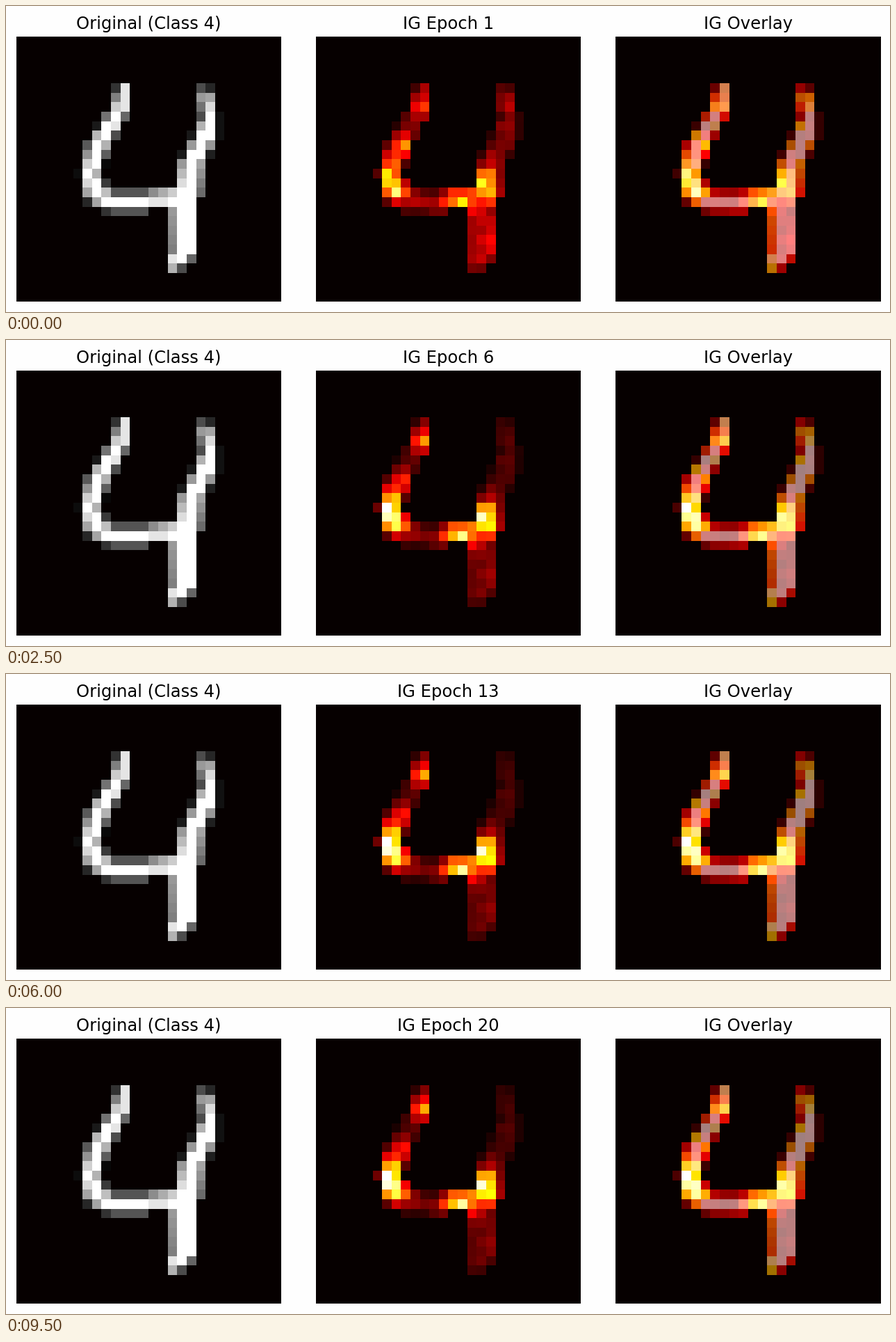
Write a matplotlib script that moves like this. It is 1272x440 px and loops after 10000 ms.

```python
import numpy as np
import matplotlib.pyplot as plt
from matplotlib.animation import FuncAnimation

W, H, DPI = 1272, 440, 100
EPOCHS, INTERVAL = 20, 500
N = 28
LEFT, STEP, TOP, SIDE = 14.8, 431.3, 44.35, 381
SETTLE = 2.5  # epochs
BLACK = np.array([6, 0, 0]) / 255
HOT = plt.get_cmap("hot")

plt.rcParams["font.family"] = "DejaVu Sans"

# Outline key points of each stroke: (line, near edge, far edge).
# The arms run down the rows, the bar runs across the columns.
LEFT_ARM = [(5, 10.8, 11.9), (7, 10.2, 11.9), (9, 8.9, 10.9),
            (11, 7.65, 9.7), (14, 6.95, 8.7), (16, 7.35, 9.75)]
RIGHT_ARM = [(5, 19.7, 20.15), (6, 19.4, 20.65), (8, 19.7, 21.07),
             (10, 18.9, 21.07), (13, 17.4, 19.65), (16, 17, 19.42),
             (17, 16, 19), (18, 16.4, 19), (22, 16.5, 19),
             (23, 16.1, 18.4), (24, 16.3, 17.3)]
BAR = [(7, 17, 17.15), (8, 17, 17.65), (9, 16.9, 18.2), (10, 16.67, 18.33),
       (13, 16.67, 18.33), (14, 16.45, 17.9), (16, 16.2, 17.9)]

# Hot spots: row, column, radius, strength at the start and when trained.
SPOTS = [(14.2, 7.6, 1.6, .5, .9),     # elbow
         (16, 8, .5, .65, .45),        # elbow corner
         (11.5, 9, .8, .45, .25),      # left arm
         (7.1, 11.1, 1, .25, .5),      # left tip
         (15.2, 17.2, 1.3, .5, .75),   # junction
         (17, 14.5, 1.2, .5, .75),     # crossbar
         (6.5, 20, .8, .2, .03),       # right tip
         (21.5, 17.7, 2, .15, .08)]    # stem
BASE_START, BASE_END = .18, .1


def stroke(knots):
    """Share of each cell that lies between the two edges."""
    pos, near, far = np.array(knots).T
    lines = np.arange(N)[:, None]
    cells = np.arange(N)
    low = np.interp(lines, pos, near)
    high = np.interp(lines, pos, far)
    cover = np.clip(np.minimum(cells + 1, high) - np.maximum(cells, low), 0, 1)
    return cover * ((lines >= pos[0]) & (lines <= pos[-1]))


def make_heat(ink):
    """Attribution at the start and after training."""
    rows, cols = np.mgrid[:N, :N]
    start = np.full((N, N), BASE_START)
    end = np.full((N, N), BASE_END)
    for row, col, radius, early, late in SPOTS:
        glow = np.exp(-((rows - row) ** 2 + (cols - col) ** 2) / (2 * radius ** 2))
        start += early * glow
        end += late * glow
    grain = np.random.default_rng(4).uniform(.75, 1.25, (N, N))
    mask = np.sqrt(ink) * grain
    return start * mask, end * mask


def hot_rgb(values):
    return np.where(values[..., None] < .02, BLACK, HOT(values)[..., :3])


digit = np.maximum.reduce([stroke(LEFT_ARM), stroke(RIGHT_ARM), stroke(BAR).T])
heat_start, heat_end = make_heat(digit)
digit_gray = np.maximum(digit[..., None], BLACK)
digit_hot = hot_rgb(digit)

fig = plt.figure(figsize=(W / DPI, H / DPI), dpi=DPI, facecolor="#fefefe")


def add_panel(index, title):
    left = LEFT + index * STEP
    ax = fig.add_axes([left / W, 1 - (TOP + SIDE) / H, SIDE / W, SIDE / H])
    ax.axis("off")
    image = ax.imshow(digit_gray, aspect="auto", interpolation="nearest")
    return image, ax.set_title(title, fontsize=17.5, pad=8.5)


add_panel(0, "Original (Class 4)")
heat_image, heat_title = add_panel(1, "IG Epoch 1")
overlay_image, _ = add_panel(2, "IG Overlay")


def update(i):
    settled = 1 - np.exp(-i / SETTLE)
    heat = heat_start + (heat_end - heat_start) * settled
    rgb = hot_rgb(np.clip(heat, 0, 1))
    heat_image.set_data(rgb)
    overlay_image.set_data((digit_hot + rgb) / 2)
    heat_title.set_text(f"IG Epoch {i + 1}")
    return heat_image, overlay_image, heat_title


anim = FuncAnimation(fig, update, frames=EPOCHS, interval=INTERVAL,
                     repeat=True, repeat_delay=0, blit=False)
plt.show()
```
